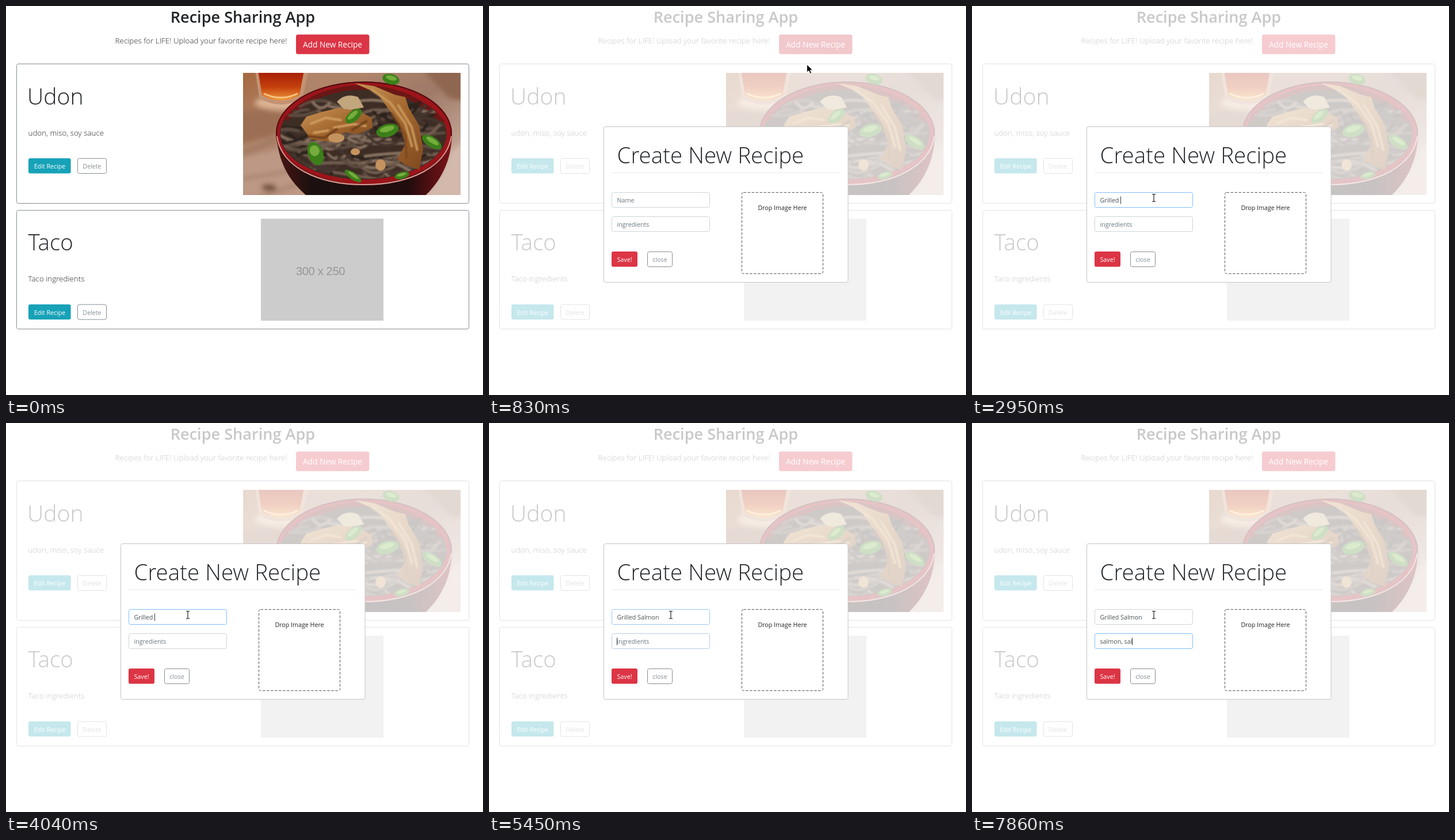
An HTML page for the animation above (8 s loop, 829 by 675 pixels).

```html
<!DOCTYPE html>
<html lang="en">
<head>
<meta charset="utf-8">
<title>Recipe Sharing App</title>
<style>
html, body { margin: 0; width: 100%; height: 100%; overflow: hidden; background: #fff; }
svg { display: block; width: 829px; height: 675px; font-family: "Open Sans", "Noto Sans", sans-serif; }
text { white-space: pre; fill: #212529; }
.mid { text-anchor: middle; }
.big { font-weight: 300; font-size: 38.5px; }
.body { font-weight: 300; font-size: 13.4px; }
.small { font-size: 10.7px; }
.white { fill: #fff; }
.grey { fill: #868e96; }
.hint { fill: #6c757d; }
.typed { fill: #495057; }
.card, .outline { fill: #fff; stroke: #868e96; }
.input { fill: #fff; stroke: #ced4da; }
</style>
</head>
<body>
<svg viewBox="0 0 829 675">
  <defs>
    <linearGradient id="wood" x2="1" y2=".8">
      <stop offset="0" stop-color="#a5683f"/><stop offset=".3" stop-color="#b0866c"/>
      <stop offset=".6" stop-color="#a07a68"/><stop offset="1" stop-color="#ceb3a4"/>
    </linearGradient>
    <linearGradient id="tea" x2="0" y2="1">
      <stop offset="0" stop-color="#a31c05"/><stop offset=".55" stop-color="#c4400c"/><stop offset="1" stop-color="#f09a3c"/>
    </linearGradient>
    <linearGradient id="shell" x2="1" y2="0">
      <stop offset="0" stop-color="#4a1512"/><stop offset=".2" stop-color="#1b1010"/>
      <stop offset=".75" stop-color="#220d0d"/><stop offset="1" stop-color="#7d1216"/>
    </linearGradient>
    <linearGradient id="fried" x2="1" y2="1">
      <stop offset="0" stop-color="#c99557"/><stop offset=".5" stop-color="#a3682f"/><stop offset="1" stop-color="#80491f"/>
    </linearGradient>
    <clipPath id="frame"><rect x="412" y="116" width="378" height="212"/></clipPath>
    <clipPath id="inside"><ellipse cx="621" cy="222" rx="144" ry="78"/></clipPath>
    <filter id="soft"><feGaussianBlur stdDeviation="4"/></filter>
    <filter id="smooth"><feGaussianBlur stdDeviation=".8"/></filter>
    <g id="buttons">
      <rect x="39" y="264.3" width="73.6" height="26.3" rx="3" fill="#17a2b8"/>
      <text class="small mid white" x="76" y="282">Edit Recipe</text>
      <rect class="outline" x="124.5" y="264.5" width="50" height="26" rx="3"/>
      <text class="small mid grey" x="149.5" y="282">Delete</text>
    </g>
  </defs>

  <text class="mid" x="411.5" y="29" font-size="27.1" font-weight="600">Recipe Sharing App</text>
  <text class="body mid" x="339" y="65">Recipes for LIFE! Upload your favorite recipe here!</text>
  <rect id="add" x="504" y="49.6" width="127.4" height="33.8" rx="3.5"/>
  <text class="mid white" x="567.5" y="72" font-size="13.7">Add New Recipe</text>

  <rect class="card" x="18.5" y="100.5" width="786" height="242" rx="3"/>
  <text class="big" x="37" y="171" style="font-size:39.2px">Udon</text>
  <text class="body" x="38.5" y="225">udon, miso, soy sauce</text>
  <use href="#buttons"/>

  <g clip-path="url(#frame)">
    <rect x="412" y="116" width="378" height="212" fill="url(#wood)"/>
    <g filter="url(#soft)">
      <path d="M520 105H660L600 135L500 160Z" fill="#b08468"/>
      <path d="M405 185L440 178L500 190L465 225L405 240Z" fill="#9c6e52"/>
      <path d="M720 105H800V165L770 160Z" fill="#8f6650"/>
      <path d="M405 265L480 245L530 335H405Z" fill="#bd9884"/>
      <path d="M775 250L800 235V335H735Z" fill="#d2b9ab"/>
      <path d="M412 255L470 232M412 300L500 285M430 335L520 305" stroke="#8f6a55" stroke-width="3"/>
      <ellipse cx="457" cy="315" rx="13" ry="6" fill="#6b4a38"/>
      <ellipse cx="478" cy="168" rx="46" ry="12" fill="#dcb494"/>
    </g>
    <path d="M433 112L440 160Q478 182 515 160L526 112Z" fill="#c39274"/>
    <path d="M438 112L445 155Q478 173 510 155L518 112Z" fill="url(#tea)"/>
    <path d="M448 152Q478 166 507 152" fill="none" stroke="#f6c584" stroke-width="3"/>

    <path d="M470 220C472 268 490 305 530 335H722C758 304 775 265 775 220Z" fill="url(#shell)"/>
    <ellipse cx="622" cy="221" rx="153" ry="90" fill="#9c141a"/>
    <ellipse cx="622" cy="221" rx="152" ry="89" fill="none" stroke="#4d0d10" stroke-width="2"/>
    <path d="M471 226C478 278 540 310 622 310S766 278 774 226" fill="none" stroke="#d99a92" stroke-width="2"/>
    <ellipse cx="621" cy="222" rx="145" ry="79" fill="#3d2d25"/>
    <path d="M486 197Q535 142 622 141Q710 144 760 203" fill="none" stroke="#6b1715" stroke-width="8"/>
    <g clip-path="url(#inside)"><g id="noodles" filter="url(#smooth)" fill="none" stroke-width="5" stroke-linecap="round"></g></g>
    <path d="M575 166Q590 150 612 158L622 176L590 182Z" fill="#c2a67c"/>
    <path d="M512 207L522 192L548 184L578 177L612 182L636 194L637 211L612 222L588 219L560 235L530 231Z" fill="url(#fried)"/>
    <path d="M530 204L556 194L582 198M570 211L604 205L625 208M535 220L560 216" fill="none" stroke="#cf9c60" stroke-width="4" stroke-linecap="round" filter="url(#smooth)"/>
    <path d="M524 226L553 229L576 213M600 216L628 199" fill="none" stroke="#71401c" stroke-width="4" filter="url(#smooth)"/>
    <path d="M606 134L640 139L676 154L694 158L700 177L718 207L725 248L718 284L694 276L680 266L694 240L684 205L660 172L646 152Z" fill="url(#fried)"/>
    <path d="M635 145L668 168L694 204L706 245M681 171L705 210L715 251" fill="none" stroke="#c9985c" stroke-width="4" filter="url(#smooth)"/>
    <path d="M670 185L694 225L696 265" fill="none" stroke="#7e451b" stroke-width="3" filter="url(#smooth)"/>
    <g fill="#c4935f">
      <ellipse cx="574" cy="229" rx="14" ry="8"/><ellipse cx="651" cy="276" rx="9" ry="10"/><ellipse cx="607" cy="253" rx="8" ry="6"/>
    </g>
    <g id="leaves"></g>
  </g>

  <rect class="card" x="18.5" y="354.5" width="786" height="206" rx="3"/>
  <text class="big" x="38.5" y="424">Taco</text>
  <text class="body" x="38.5" y="478">Taco ingredients</text>
  <use href="#buttons" y="253.5"/>
  <rect x="443" y="369" width="213" height="177" fill="#ccc"/>
  <text class="mid" x="546.5" y="467" style="fill:#969696;font:20px 'Liberation Sans',Arial,sans-serif;letter-spacing:-.3px">300 x 250</text>

  <g id="modal">
    <rect width="829" height="675" fill="#fff" opacity=".75"/>
    <rect x="199.5" y="209.5" width="424.5" height="270" rx="3" fill="#fff" stroke="#c4c4c4"/>
    <text class="big" x="222.5" y="273">Create New Recipe</text>
    <path d="M213 289.5H610" stroke="#e9e9e9"/>
    <rect class="input" x="213.5" y="323.5" width="170" height="26" rx="3"/>
    <text class="small field" x="222.5" y="341"></text>
    <rect class="input" x="213.5" y="365.5" width="170" height="26" rx="3"/>
    <text class="small field" x="222.5" y="383"></text>
    <rect id="caret" width="1" height="13" fill="#343a40"/>
    <rect x="213" y="426" width="45" height="26.5" rx="3" fill="#dc3545"/>
    <text class="small mid white" x="235.5" y="444">Save!</text>
    <rect class="outline" x="275.5" y="426.5" width="43" height="26" rx="3"/>
    <text class="small mid grey" x="297" y="444">close</text>
    <rect x="439.5" y="323.5" width="141" height="141" rx="3" fill="#fff" stroke="#555" stroke-dasharray="4.5 2.5"/>
    <text class="small mid" x="510" y="354">Drop Image Here</text>
  </g>

  <path id="arrow" d="M0 0V13.5L3.2 10.6L5.6 15.8L7.9 14.8L5.6 9.7H9.8Z" fill="#000" stroke="#fff" stroke-width=".8"/>
  <path id="beam" d="M-3 -6.5H-1L0 -5.5L1 -6.5H3M0 -5.5V5.5M-3 6.5H-1L0 5.5L1 6.5H3" fill="none" stroke="#222" stroke-width="1.2"/>
</svg>
<script>
const LOOP = 8000, OPEN = 830, FOCUS_NAME = 1470, FOCUS_INGREDIENTS = 5400, FADE = 150;
const $ = id => document.getElementById(id);
const inputs = document.querySelectorAll('.input');
const fields = document.querySelectorAll('.field');
const clamp = v => Math.max(0, Math.min(1, v));
const mix = (a, b, k) => `rgb(${a.map((v, i) => Math.round(v + (b[i] - v) * k))})`;
const show = (el, on) => el.setAttribute('visibility', on ? 'visible' : 'hidden');

// Moments at which each field's text becomes the given prefix length
const typing = [
  { hint: 'Name', text: 'Grilled Salmon', keys: [
    [1850, 1], [2010, 2], [2170, 3], [2330, 4], [2480, 5], [2640, 6], [2800, 7], [2950, 8],
    [3260, 9], [4040, 8], [4340, 9], [4650, 10], [4820, 11], [4970, 12], [5120, 13], [5270, 14]] },
  { hint: 'ingredients', text: 'salmon, sal', keys: [
    [5920, 1], [6060, 2], [6190, 3], [6320, 4], [6480, 5], [6640, 6], [6790, 7], [7170, 8],
    [7630, 9], [7750, 10], [7860, 11]] }
];
const path = [[450, 640, 250], [600, 600, 120], [680, 578, 64], [760, 578, 64],
  [830, 553, 101], [1000, 480, 190], [1200, 375, 295], [1390, 313, 333], [1550, 316, 333]];

function pointerAt(t) {
  const i = path.findIndex(p => p[0] > t);
  if (i < 0) return path[path.length - 1].slice(1);
  const [a, b] = [path[i - 1], path[i]], k = (t - a[0]) / (b[0] - a[0]);
  return [a[1] + (b[1] - a[1]) * k, a[2] + (b[2] - a[2]) * k];
}

function drawFood() {
  let seed = 11;
  const rnd = () => (seed = seed * 16807 % 2147483647) / 2147483647;
  const tones = ['#2b201b', '#45362e', '#5d4b40', '#705c4e', '#85705f'];
  let out = '';
  for (let i = 0; i < 120; i++) {
    const x = 480 + rnd() * 270, y = 165 + rnd() * 130, r = 12 + rnd() * 34;
    out += `<path d="M${x - r} ${y}q${r} ${(rnd() - .35) * 2.2 * r} ${r * 2} ${(rnd() - .5) * r}" stroke="${tones[i % 5]}"/>`;
  }
  $('noodles').innerHTML = out;
  $('leaves').innerHTML = [[538, 256, 13, 21, -20], [604, 191, 17, 9, -40], [663, 216, 20, 11, -15],
    [740, 236, 19, 9, 32], [688, 294, 13, 6, -15], [603, 295, 17, 6, 35], [669, 127, 15, 9, 15]]
    .map(([x, y, rx, ry, a]) => `<g transform="translate(${x} ${y}) rotate(${a})">
      <ellipse rx="${rx}" ry="${ry}" fill="#3c7f1a"/>
      <ellipse cy="${-ry * .25}" rx="${rx * .65}" ry="${ry * .45}" fill="#74ad3c"/></g>`).join('');
}

function draw(t) {
  const hover = clamp((t - 600) / FADE) - clamp((t - OPEN) / FADE);
  $('add').setAttribute('fill', mix([220, 53, 69], [200, 35, 51], hover));
  show($('modal'), t >= OPEN);

  const second = clamp((t - FOCUS_INGREDIENTS) / FADE);
  const focus = [clamp((t - FOCUS_NAME + 80) / FADE) - second, second];
  typing.forEach(({ hint, text, keys }, i) => {
    const key = keys.filter(k => k[0] <= t).pop();
    fields[i].textContent = key ? text.slice(0, key[1]) : hint;
    fields[i].setAttribute('class', 'small field ' + (key ? 'typed' : 'hint'));
    inputs[i].style.stroke = mix([206, 212, 218], [128, 189, 255], focus[i]);
  });

  const active = t < FOCUS_INGREDIENTS ? 0 : 1;
  const started = t >= typing[active].keys[0][0];
  const width = started ? fields[active].getComputedTextLength() : 0;
  $('caret').setAttribute('x', Math.round(222.2 + width));
  $('caret').setAttribute('y', active ? 372.5 : 330.5);
  show($('caret'), t >= FOCUS_NAME && !(t >= 3720 && t < 4040));

  const [x, y] = t < 450 ? [0, 0] : pointerAt(t);
  const overInput = t >= OPEN && x < 384 && y > 323;
  for (const id of ['arrow', 'beam']) $(id).setAttribute('transform', `translate(${x} ${y})`);
  show($('arrow'), t >= 450 && !overInput);
  show($('beam'), overInput);
}

function tick() {
  draw(performance.now() % LOOP);
  requestAnimationFrame(tick);
}
drawFood();
tick();
</script>
</body>
</html>
```
